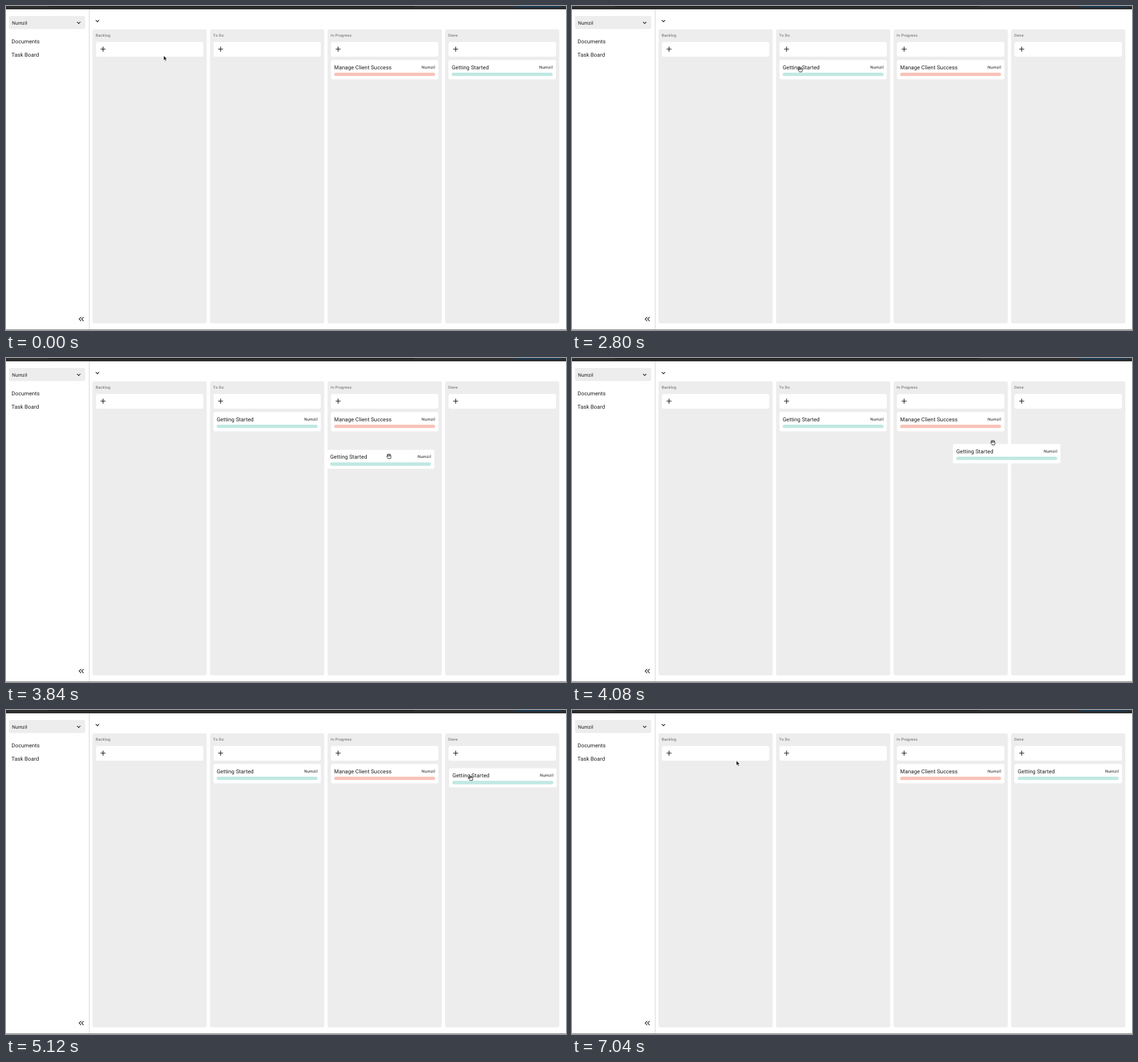
Animation, 838 px wide and 486 px high, one loop 7120 ms. Source, as an HTML page:

```html
<!DOCTYPE html>
<html lang="en">
<head>
<meta charset="utf-8">
<title>Task board</title>
<style>
html, body { margin: 0; width: 100%; height: 100%; overflow: hidden; background: #fff; }
svg { display: block; width: 838px; height: 486px; }
text { font-family: Roboto, sans-serif; fill: #1c1c1c; text-rendering: geometricPrecision; }
.item { font-size: 8.1px; letter-spacing: .00938em; }
.owner { font-size: 6.08px; letter-spacing: .0333em; text-anchor: end; }
.head { font-size: 5.75px; letter-spacing: .0333em; fill: #626262; }
.pick { font-size: 7.2px; letter-spacing: .00938em; }
.line { fill: none; stroke: #222; stroke-width: 1.1; }
.paper { fill: #fff; filter: drop-shadow(0 .5px .6px rgba(0,0,0,.1)); }
.hand { fill: #fff; stroke: #111; stroke-width: .9; stroke-linejoin: round; }
</style>
</head>
<body>
<svg viewBox="0 0 838 486">
  <rect width="838" height="486" fill="#fff"/>
  <rect width="838" height="5" fill="#2d2c2f"/>
  <rect x="64" width="547" height="1" fill="#1a191b"/>
  <rect x="760" width="70" height="2" fill="#163852"/>
  <rect y="485" width="838" height="1" fill="#8b8b8b"/>
  <rect x="124" y="5" width="1" height="480" fill="#dadada"/>
  <rect x="4.5" y="15" width="114" height="19.5" rx="2" fill="#ededed"/>
  <text class="pick" x="9" y="27.5">Numzil</text>
  <path class="line" d="M106.3 23.8l2.5 2.5 2.5-2.5M134.3 21.2l2.5 2.5 2.5-2.5"/>
  <text class="item" x="8.3" y="56">Documents</text>
  <text class="item" x="8.3" y="75.8">Task Board</text>
  <path class="line" d="M112.5 466.6l-3 3 3 3M116.2 466.6l-3 3 3 3"/>
  <g id="board"></g>
  <g id="cursor">
    <path id="arrow" fill="#0a0a0a" stroke="#fff" stroke-width=".5" d="M0 0V7l1.6-1.4 1.2 2.6 1.2-.6-1.2-2.5h2.1z"/>
    <g id="grab" class="hand" transform="scale(.88)">
      <path d="M-1.4 3.8C-2 2-4 .9-3.8 0c.2-.7 1.1-.5 1.7.2L-3-2.6c-.2-1 1-1.3 1.3-.5C-1.8-4.1-.3-4.3-.1-3c.2-1.1 1.5-1 1.6.2.4-.8 1.5-.5 1.5.5 0 2.1 1 3-.2 6.1z"/>
      <path d="M-1.6-2.5l.5 2.6M0-2.8l.2 2.8M1.6-2.5L1.5 0"/>
    </g>
    <path id="point" class="hand" d="M-1.4 4.4C-2 2.8-3.7 1.6-3.5.7c.2-.7 1.1-.5 1.7.2v-4.7c0-1.1 1.4-1.1 1.4 0v2.6C0-1.8 1-1.6 1.1-.8c.4-.6 1.2-.3 1.3.4.5-.4 1.2-.1 1.2.7 0 1.9-.3 2.8-.8 4.1z"/>
  </g>
</svg>
<script>
const LOOP = 7120, STEP = 80;
const SHUFFLE = 160, DRAG = 3280, DROP = 5280, SETTLED = 5600;
const TEAL = "#c1e8e2", PINK = "#f8c3ba";
const CARD = { y: 81, w: 161, h: 29 };
const columnX = i => 129.4 + i * 175.9;
const cardX = i => columnX(i) + 4.9;
const byId = id => document.getElementById(id);

const card = (id, i, title, color) => `
  <g id="${id}" transform="translate(${cardX(i)} ${CARD.y})">
    <rect class="paper" width="${CARD.w}" height="${CARD.h}" rx="2"/>
    <text class="item" x="5" y="13.6">${title}</text>
    <text class="owner" x="156.2" y="12.6">Numzil</text>
    <rect x="5" y="18.9" width="151" height="5.2" rx="2.6" fill="${color}"/>
  </g>`;

const column = (name, i) => `
  <g transform="translate(${columnX(i)} 0)">
    <rect y="35" width="171" height="441" rx="3" fill="#ededed"/>
    <text class="head" x="4.8" y="46.4">${name}</text>
    <rect class="paper" x="5" y="54" width="161" height="22" rx="2"/>
    <path class="line" d="M12.1 64.7h7.4M15.8 61v7.4"/>
  </g>`;

byId("board").innerHTML = ["Backlog", "To Do", "In Progress", "Done"].map(column).join("") +
  card("client", 2, "Manage Client Success", PINK) +
  card("todo", 1, "Getting Started", TEAL) +
  card("done", 3, "Getting Started", TEAL) +
  card("floating", 1, "Getting Started", TEAL);

const linear = k => k;
const easeIn = k => k * k;
const easeOut = k => 1 - (1 - k) ** 2;
const smooth = k => k * k * (3 - 2 * k);

// Chained moves along quadratic curves; rests between moves.
class Track {
  constructor(...start) { this.start = this.last = start; this.moves = []; }
  move(begin, end, to, ease = linear, via) {
    const from = this.last;
    via ??= from.map((v, i) => (v + to[i]) / 2);
    this.moves.push({ begin, end, from, via, to, ease });
    this.last = to;
    return this;
  }
  at(t) {
    const m = this.moves.findLast(m => m.begin <= t);
    if (!m) return this.start;
    const k = m.ease(Math.min(1, (t - m.begin) / (m.end - m.begin))), r = 1 - k;
    return m.from.map((v, i) => r * r * v + 2 * r * k * m.via[i] + k * k * m.to[i]);
  }
}

const cursor = new Track(236, 74.5)
  .move(SHUFFLE - STEP, SHUFFLE, [667, 156])
  .move(480, 1360, [430, 92], easeOut)
  .move(2000, 2720, [341.5, 95.5], smooth, [200, 148])
  .move(3040, 3680, [555, 153], easeIn, [456, 153])
  .move(3760, 4560, [689.5, 103], easeOut, [598, 141])
  .move(4560, 5120, [695.5, 102.3], easeOut)
  .move(6000, 6720, [246, 76], smooth, [520, 150]);

const floating = new Track(319, 89)
  .move(DRAG, 3680, [442, 129], easeIn, [316, 97])
  .move(3760, 4560, [642, 93], easeOut, [542, 161])
  .move(4560, DROP, [664, 87], easeOut)
  .move(DROP, SETTLED, [cardX(3), CARD.y], easeOut);

const overCard = ([x, y], columns) => y > CARD.y && y < CARD.y + CARD.h &&
  columns.some(i => x > cardX(i) && x < cardX(i) + CARD.w);
const place = (id, [x, y]) => byId(id).setAttribute("transform", `translate(${x} ${y})`);
const show = (id, on) => byId(id).style.display = on ? "" : "none";

function draw() {
  const t = Math.floor(performance.now() % LOOP / STEP) * STEP;
  const waiting = t >= SHUFFLE && t < DROP;
  const pointer = cursor.at(t);
  const holding = t >= DRAG && t < DROP;
  const active = holding || overCard(pointer, [2, waiting ? 1 : 3]);
  const kind = !active ? "arrow" : waiting ? "grab" : "point";
  show("todo", waiting);
  show("done", !waiting);
  show("floating", t >= DRAG && t < SETTLED);
  place("floating", floating.at(t));
  place("cursor", pointer);
  for (const id of ["arrow", "grab", "point"]) show(id, id === kind);
  requestAnimationFrame(draw);
}
draw();
</script>
</body>
</html>
```
